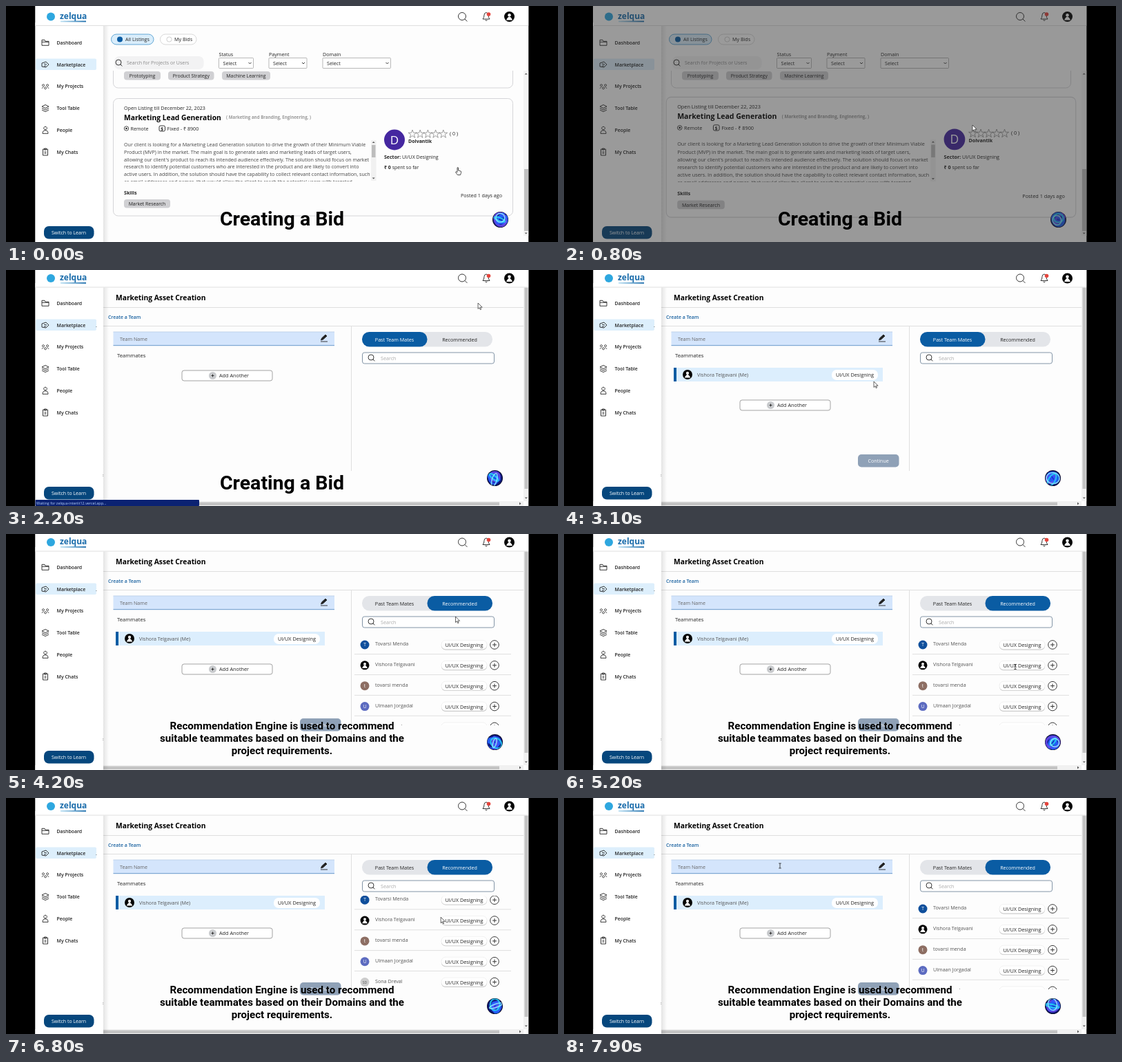
Recreate the animation shown at these times as an HTML page. Size 800 by 343 pixels, loop 8 s.

```html
<!DOCTYPE html>
<html lang="en">
<head>
<meta charset="utf-8">
<title>Creating a Bid</title>
<style>
html, body { margin: 0; width: 100%; height: 100%; overflow: hidden; background: #000; }
svg { display: block; width: 800px; height: 343px; }
text { font-family: "Open Sans", "Noto Sans", sans-serif; white-space: pre; }
.over text { font-family: Roboto, "Liberation Sans", sans-serif; font-weight: 700; text-anchor: middle; }
</style>
</head>
<body>
<svg id="stage" viewBox="0 0 800 343" xmlns="http://www.w3.org/2000/svg"></svg>
<script>
const LOOP = 8000, STEP = 100;
const BLUE = '#0a5ca3', INK = '#222', PAGE = '#fdfdfd';

// Markup helpers
const attrs = o => Object.entries(o).map(([k, v]) => ` ${k}="${v}"`).join('');
const tag = (name, o, inner = '') => `<${name}${attrs(o)}>${inner}</${name}>`;
const rect = (x, y, width, height, fill, o = {}) => tag('rect', { x, y, width, height, fill, ...o });
const circle = (cx, cy, r, fill, o = {}) => tag('circle', { cx, cy, r, fill, ...o });
const path = (d, o = {}) => tag('path', { d, fill: 'none', stroke: INK, 'stroke-width': 0.9, ...o });
const group = (o, ...parts) => tag('g', o, parts.join(''));
const text = (x, y, str, o = {}) => tag('text', { x, y, 'font-size': 7.15, fill: INK, ...o }, str);
const mid = { 'text-anchor': 'middle' }, bold = { 'font-weight': 700 };
const line = (x1, y1, x2, y2, stroke = '#dcdcdc') => path(`M${x1} ${y1}L${x2} ${y2}`, { stroke });
const chip = (x, y, w, label) => rect(x, y, w, 12.5, '#d0d0d3', { rx: 4 }) + text(x + w / 2, y + 8.8, label, { ...mid, 'font-size': 6.9 });
const lens = (x, y, r) => circle(x, y, r, 'none', { stroke: INK, 'stroke-width': 0.9 }) + path(`M${x + r * .7} ${y + r * .7}l${r * .65} ${r * .65}`);
const arrowHead = (x, y, d) => path(`M${x - 2} ${y + d}l2 ${-2 * d}l2 ${2 * d}z`, { fill: '#555', stroke: 'none' });

const person = (x, y, r) => circle(x, y, r, '#050505') +
  circle(x, y - r * .3, r * .3, '#fff') + path(`M${x - r * .6} ${y + r * .65}q${r * .6} ${-r * 1.3} ${r * 1.2} 0z`, { fill: '#fff', stroke: 'none' });

function sidebar() {
  const icons = [
    'M-5 -4h4l1 2h5v6h-10zM-5 -1h10',
    'M-5 -2l6 -2l4 4l-4 4l-6 -1zM-2 -1l4 1M-2 2h3',
    'M-3 -3a1.5 1.5 0 1 0 .1 0zM3 -3a1.5 1.5 0 1 0 .1 0zM0 1a1.5 1.5 0 1 0 .1 0zM-5 3l2 -2M5 3l-2 -2',
    'M0 -5l5 2.5l-5 2.5l-5 -2.5zM-5 0l5 2.5l5 -2.5M-5 2.5l5 2.5l5 -2.5',
    'M0 -5a2.3 2.3 0 1 0 .1 0zM-4 5q0 -4.5 4 -4.5t4 4.5z',
    'M-3.5 -4h7v9h-7zM-1.5 -5h3v2h-3zM-1.5 0h3M-1.5 2h3'];
  const labels = ['Dashboard', 'Marketplace', 'My Projects', 'Tool Table', 'People', 'My Chats'];
  return rect(42.5, 24, 98.5, 330, '#fff') + rect(141, 24, 8, 330, 'url(#shade)') +
    rect(43, 76.5, 88, 16.5, '#ddeffc', { rx: 2 }) +
    labels.map((label, i) => {
      const y = 53.3 + i * 31.75;
      return path(icons[i], { transform: `translate(57 ${y})` }) +
        text(73.5, y + 2.6, label, { 'font-size': 6.95, 'font-weight': 600 });
    }).join('') +
    rect(55, 320, 72.5, 18.5, '#06477d', { rx: 7 }) +
    text(91, 332, 'Switch to Learn', { ...mid, fill: '#fff', 'font-size': 7 });
}

const header = () => rect(42.5, -4, 715, 33, '#fff') +
  circle(65, 15.5, 6, '#2ea7df') +
  text(78, 18.5, 'zelqua', { ...bold, 'font-size': 12, fill: '#1a6cab' }) +
  rect(79, 21.5, 37, 1.8, 'url(#brand)') +
  lens(661, 15, 5.5) +
  path('M691 19q2 -2 2 -6q0 -3 3 -3.5q3 .5 3 3.5q0 4 2 6zM694.5 20.5q1.5 1.5 3 0') + circle(699.5, 12, 2.8, '#e5453d') +
  person(729.5, 15.5, 7.5) + line(43, 28.5, 757, 28.5);

const select = (x, w, label) => text(x, 72.5, label) +
  rect(x, 75.5, w, 15, '#fff', { stroke: '#8a8a8a', 'stroke-width': .6, rx: 1 }) +
  text(x + 6, 86, 'Select') + path(`M${x + w - 7} 82l2 2l2 -2`);

const DESCRIPTION = [
  'Our client is looking for a Marketing Lead Generation solution to drive the growth of their Minimum Viable',
  'Product (MVP) in the market. The main goal is to generate sales and marketing leads of target users,',
  'allowing our client\'s product to reach its intended audience effectively. The solution should focus on market',
  'research to identify potential customers who are interested in the product and are likely to convert into',
  'active users. In addition, the solution should have the capability to collect relevant contact information, such',
  'as email addresses and names, that would allow the client to reach the potential users with targeted'];

const listingHead = () => text(171, 151, 'Open Listing till December 22, 2023') +
  text(171, 165.5, 'Marketing Lead Generation', { ...bold, 'font-size': 10.3, fill: '#000' }) +
  text(319, 164, '( Marketing and Branding, Engineering, )', { ...bold, 'font-size': 6.15, fill: '#999' }) +
  circle(174.5, 178, 3.2, 'none', { stroke: INK, 'stroke-width': .8 }) + circle(174.5, 178, 1.3, INK) +
  text(180.5, 180.6, 'Remote') +
  rect(222, 174, 8.5, 8, 'none', { stroke: INK, 'stroke-width': .9, rx: 2 }) + text(226.2, 180.6, '$', { ...mid, ...bold, 'font-size': 6.5 }) +
  text(233.5, 180.6, 'Fixed - ₹ 8900') +
  group({ 'clip-path': 'url(#descClip)' }, ...DESCRIPTION.map((s, i) => text(171, 203.8 + i * 10.85, s, { 'font-size': 7.12, fill: '#444' })));

function card() {
  const star = 'M0 -6l1.5 4.2h4.4l-3.5 2.7l1.3 4.4l-3.7 -2.7l-3.7 2.7l1.3 -4.4l-3.5 -2.7h4.4z';
  const stars = [0, 1, 2, 3, 4].map(i => path(star, { transform: `translate(${589 + i * 11.2} 186)`, stroke: '#777', 'stroke-width': .7 }));
  return rect(155.5, 134.5, 579, 170.5, PAGE, { rx: 7, stroke: '#d5d5d8' }) + listingHead() +
    rect(529, 195, 7.5, 59, '#f1f1f1') + rect(530, 202, 5.5, 18, '#bdbdbd') + arrowHead(532.7, 198, 1) + arrowHead(532.7, 250.5, -1) +
    text(171, 274, 'Skills', bold) + chip(171, 281, 67, 'Market Research') +
    circle(563, 194.5, 15, '#4527a0') + text(563, 200.5, 'D', { ...mid, 'font-size': 17, fill: '#fff' }) +
    stars.join('') + text(643, 188, '( 0 )') + text(583, 199, 'Dolvantik', { ...bold, 'font-size': 7 }) +
    text(548, 221.5, '<tspan font-weight="700">Sector:</tspan> UI/UX Designing', { 'font-size': 7 }) +
    text(548, 236.5, '<tspan font-weight="700">₹ 0</tspan> spent so far', { 'font-size': 7 }) +
    text(719, 277.5, 'Posted 1 days ago', { 'text-anchor': 'end' });
}

const market = () => rect(42.5, 0, 715, 343, PAGE) +
  rect(152.5, 41, 61.5, 15, '#d9edfb', { rx: 7.5, stroke: '#3f93cb', 'stroke-width': .8 }) + circle(165, 48.5, 4, BLUE) + text(173, 51.2, 'All Listings') +
  rect(223.5, 41, 52.5, 15, '#fff', { rx: 7.5, stroke: '#cfcfcf', 'stroke-width': .8 }) + circle(236.5, 48.5, 3.6, '#fff', { stroke: '#bbb', 'stroke-width': .7 }) + text(244, 51.2, 'My Bids') +
  rect(157, 73, 129.5, 19, '#f2f2f3', { rx: 7 }) + lens(163, 82, 4) + text(175, 85.2, 'Search for Projects or Users', { fill: '#8a8a8a', 'font-size': 7 }) +
  select(308.5, 50, 'Status') + select(381, 55, 'Payment') + select(459, 98.5, 'Domain') +
  group({ 'clip-path': 'url(#feedClip)' },
    rect(155.5, 60, 579, 59, PAGE, { rx: 7, stroke: '#d5d5d8' }),
    chip(171, 95, 53, 'Prototyping'), chip(235, 95, 66.5, 'Product Strategy'), chip(313, 95, 70, 'Machine Learning')) +
  rect(750, 94, 7.5, 240, '#f4f4f4') + rect(751, 237, 6, 90, '#c1c1c1') + arrowHead(753.7, 98.5, 1) + arrowHead(753.7, 330.5, -1) +
  group({ id: 'card' }, card()) + sidebar() + header();

const drawer = () => rect(127, 0, 630.5, 343, '#fff') + group({ transform: 'translate(-26 -100)' }, listingHead());

const team = () => rect(42.5, 0, 715, 343, PAGE) +
  text(159, 44, 'Marketing Asset Creation', { ...bold, 'font-size': 10.3, fill: '#000' }) +
  line(141, 54.5, 750, 54.5) + text(148, 71.3, 'Create a Team', { 'font-weight': 600, 'font-size': 6.9, fill: '#17609f' }) +
  line(141, 81.5, 750, 81.5) + line(500.5, 82, 500.5, 292) +
  rect(155.5, 90, 320.5, 20, '#d4e5fc') + line(155.5, 90, 476, 90, '#b9cfe8') + line(155.5, 109.7, 476, 109.7, '#5d8fc5') +
  text(165, 102.7, 'Team Name', { fill: '#666' }) +
  path('M456.5 102l1 -3l5.5 -5l2 2l-5.5 5z', { fill: INK }) + line(456, 104, 466, 104, INK) +
  text(161, 126.8, 'Teammates', { 'font-size': 7.65 }) +
  group({ id: 'mate' },
    rect(159, 142, 303, 20, '#dceefd'), rect(159, 142, 4, 20, BLUE), person(179, 152, 7),
    text(193, 155, 'Vishora Telgavani (Me)', { fill: '#555' }),
    rect(388, 145, 67, 15, '#fff', { rx: 7 }), text(421.5, 155, 'UI/UX Designing', { ...mid, 'font-size': 7.3 }),
    rect(426, 268, 59.5, 18.5, '#8fa1b7', { rx: 5 }), text(455.7, 280, 'Continue', { ...mid, fill: '#fff' })) +
  group({ id: 'add' }, rect(255, 146, 131, 15, '#fff', { rx: 3, stroke: '#999', 'stroke-width': .9 }),
    circle(299.5, 153.5, 5.5, '#c9cbce'), path('M297.5 153.5h4M299.5 151.5v4'), text(309, 156.3, 'Add Another', { 'font-size': 7.3 })) +
  rect(516, 90, 189, 21.5, '#e3e5e9', { rx: 10.5 }) +
  tag('rect', { id: 'tab', y: 90, width: 94.5, height: 21.5, rx: 10.5, fill: BLUE }) +
  text(563, 103.5, 'Past Team Mates', { ...mid, id: 'past' }) + text(657.5, 103.5, 'Recommended', { ...mid, id: 'recommended' }) +
  rect(516.5, 120, 191, 16, '#fff', { rx: 3, stroke: '#75899c', 'stroke-width': .9 }) + lens(529, 127, 4) + text(543, 130.8, 'Search', { fill: '#aaa' }) +
  group({ id: 'list', 'clip-path': 'url(#listClip)' }, group({ id: 'rows' }, ...PEOPLE.map(row))) +
  rect(750, 0, 7.5, 336, '#f1f1f1') + rect(751.5, 0, 5, 318, '#c3c3c3') + arrowHead(753.8, 331.5, -1) +
  rect(42.5, 336, 707.5, 7, '#f1f1f1') + rect(50, 337.5, 665, 4.5, '#c3c3c3') +
  path('M47.5 337.5v4l-2.5 -2zM744 337.5v4l2.5 -2z', { fill: '#555', stroke: 'none' }) +
  group({ transform: 'translate(0 -5)' }, sidebar()) + group({ transform: 'translate(0 -3.5)' }, header()) +
  text(130, 83, '.') + text(140, 300, ':', { 'font-size': 6 });

const DESIGN = ['UI/UX Designing', 66], SOFTWARE = ['Software Development', 87], BRANDING = ['Marketing and Branding', 91];
const PEOPLE = [
  ['Tovarsi Menda', DESIGN, '#0f4f9c', 'T'], ['Vishora Telgavani', DESIGN],
  ['tovarsi menda', DESIGN, '#8d6e63', 't'], ['Ulmaan Jorgadal', DESIGN, '#5c6bc0', 'U'],
  ['Sona Dreval', DESIGN, '#ccc', 'SD'], ['Pel Harvone', DESIGN, '#ccc', 'PH'],
  ['Ona Felky', SOFTWARE, '#ccc', 'OF'], ['Jory Castenduz', BRANDING, '#ccc', 'JC'],
  ['Nalvek Porit', SOFTWARE, '#0d3a52', ''], ['Dolvantik', DESIGN, '#4527a0', 'D']];

function row([name, [skill, w], color, initials], i) {
  const y = 161 + i * 29.85;
  const face = color
    ? circle(520, y, 6.5, color) + text(520, y + 2.2, initials, { ...mid, 'font-size': initials.length > 1 ? 5 : 6.5, fill: color === '#ccc' ? '#555' : '#fff' })
    : person(520, y, 6.5);
  return face + text(535, y + 1.2, name, { fill: '#555' }) +
    rect(697 - w, y - 5.6, w, 13, '#bbb', { rx: 6 }) + rect(697 - w, y - 6.5, w, 13, '#fff', { rx: 6, stroke: '#e4e4e4', 'stroke-width': .5 }) +
    text(697 - w / 2, y + 3.2, skill, { ...mid, 'font-size': 7.3 }) +
    circle(708, y, 6.3, '#fff', { stroke: INK, 'stroke-width': .9 }) + path(`M705 ${y}h6M708 ${y - 3}v6`) +
    line(505, y + 13.7, 732, y + 13.7, '#ddd');
}

const defs = () => {
  const clip = (id, shape) => tag('clipPath', { id }, shape);
  const stop = (offset, color, alpha = 1) => tag('stop', { offset, 'stop-color': color, 'stop-opacity': alpha });
  return tag('defs', {}, clip('descClip', rect(165, 194, 364, 61)) + clip('feedClip', rect(150, 94, 600, 249)) +
    clip('listClip', rect(501, 142, 249, 136)) + clip('ball', circle(0, 0, 11)) +
    tag('linearGradient', { id: 'shade' }, stop(0, '#000', .1) + stop(1, '#000', 0)) +
    tag('linearGradient', { id: 'brand' }, stop(0, '#bfe3f5') + stop(1, '#1a6cab')) +
    tag('radialGradient', { id: 'deep' }, stop(0, '#1a2fd0') + stop(1, '#0a1266')));
};

const swirls = ['#1f6dff', '#6a4df0', '#2a5cff', '#25d3f5', '#8ff0ff'];
const globe = () => group({ id: 'globe' }, circle(0, 0, 11.5, '#0a0a22'),
  group({ 'clip-path': 'url(#ball)' }, circle(0, 0, 11, 'url(#deep)'),
    ...swirls.map((c, i) => tag('ellipse', { class: 'swirl', fill: 'none', stroke: c, 'stroke-width': 4 - i * .6, opacity: .85 }))));

const stage = document.getElementById('stage');
stage.innerHTML = defs() + rect(0, 0, 800, 343, '#000') +
  group({ id: 'market' }, market()) + group({ id: 'team' }, team()) + globe() +
  rect(42.5, 0, 715, 343, '#2d2d2d', { id: 'dim' }) + group({ id: 'drawer', 'clip-path': 'url(#pageClip)' }, drawer()) +
  group({ id: 'status' }, rect(42.5, 334, 237.5, 9, '#0b2272', { rx: 1 }), text(44, 341, 'Waiting for zelqua-interiit12.vercel.app...', { 'font-size': 5.4, fill: '#b9d3ff' })) +
  rect(757.5, 0, 42.5, 343, '#000') +
  group({ class: 'over' }, text(400, 318.5, 'Creating a Bid', { id: 'title', 'font-size': 28.5, fill: '#000' }),
    group({ id: 'caption' }, ...['Recommendation Engine is used to recommend', 'suitable teammates based on their Domains and the', 'project requirements.']
      .map((s, i) => text(400, 284.3 + i * 17.8, s, { 'font-size': 15.15, fill: '#000' })))) +
  group({ id: 'cursor' },
    path('M0 0v8.5l2 -1.8l1.3 3l1.3 -.6l-1.3 -2.9h2.8z', { id: 'arrow', fill: '#fff', 'stroke-width': .7 }),
    path('M-1 0q1 -1 1.5 0v4l3.5 1q1 .5 .5 2.5l-1 3h-4l-3 -4q0 -1.5 2.5 0z', { id: 'hand', fill: '#fff', 'stroke-width': .8 }),
    path('M-1.8 -3.5h3.6M0 -3.5v7M-1.8 3.5h3.6', { id: 'beam', 'stroke-width': .8 }));
document.getElementById('drawer').removeAttribute('clip-path');

const parts = Object.fromEntries([...stage.querySelectorAll('[id]')].map(el => [el.id, el]));
const swirlNodes = [...stage.querySelectorAll('.swirl')];
const set = (id, name, value) => parts[id].setAttribute(name, value);
const show = (id, on) => set(id, 'display', on ? 'inline' : 'none');
const ramp = (t, a, b) => { const p = Math.min(1, Math.max(0, (t - a) / (b - a))); return p * p * (3 - 2 * p); };

// time, x, y, pointer shape from then on
const POINTER = [
  [0, 655, 235, 'hand'], [150, 655, 235, 'hand'], [500, 610, 195, 'arrow'], [800, 592, 173, 'arrow'], [1000, 592, 173, 'arrow'],
  [1600, 685, 48, 'arrow'], [2300, 684, 48, 'arrow'], [2850, 335, 175, 'arrow'], [3100, 449, 162, 'arrow'], [3700, 652, 99, 'arrow'],
  [4000, 652, 99, 'arrow'], [4600, 650, 180, 'beam'], [5200, 654, 193, 'beam'], [5400, 660, 193, 'arrow'], [6100, 694, 191, 'arrow'],
  [6600, 694, 191, 'arrow'], [7300, 372, 101, 'beam'], [7800, 313, 98.5, 'beam'], [8000, 313, 98.5, 'beam']];

function movePointer(t) {
  const i = POINTER.findIndex((k, n) => t < POINTER[n + 1][0]);
  const [t0, x0, y0, shape] = POINTER[i], [t1, x1, y1] = POINTER[i + 1];
  const p = ramp(t, t0, t1);
  set('cursor', 'transform', `translate(${x0 + (x1 - x0) * p} ${y0 + (y1 - y0) * p})`);
  for (const id of ['arrow', 'hand', 'beam']) show(id, id === shape);
}

function render(t) {
  const onTeam = t >= 2000, recommending = t >= 3900, joined = t >= 2500;
  show('market', !onTeam);
  show('team', onTeam);
  const scale = 1 + .025 * ramp(t, 50, 400);
  set('card', 'transform', `translate(445 220) scale(${scale}) translate(-445 -220)`);
  set('dim', 'opacity', onTeam ? 0 : .48 * ramp(t, 450, 800));
  show('drawer', !onTeam && t >= 1000);
  set('drawer', 'transform', `translate(${631 * (1 - ramp(t, 900, 1400))} 0)`);

  show('status', onTeam && t < 2500);
  show('title', t < 2700);
  show('caption', t >= 4200);
  show('mate', joined);
  set('add', 'transform', `translate(0 ${joined ? 43 : 0})`);
  set('tab', 'x', recommending ? 610.5 : 516);
  set('past', 'fill', recommending ? INK : '#fff');
  set('recommended', 'fill', recommending ? '#fff' : INK);
  show('list', recommending);
  set('rows', 'transform', `translate(0 ${-173 * (ramp(t, 5300, 6050) - ramp(t, 6300, 6900))})`);

  set('globe', 'transform', onTeam ? 'translate(708.5 302.5)' : 'translate(716.5 310.5)');
  swirlNodes.forEach((node, i) => {
    const turn = t * .09 + i * 67, phase = t / 420 + i * 1.7;
    node.setAttribute('rx', 8 + 2 * Math.sin(phase * .6));
    node.setAttribute('ry', 5 + 3 * Math.sin(phase));
    node.setAttribute('cx', 3 * Math.cos(phase));
    node.setAttribute('transform', `rotate(${turn})`);
  });
  movePointer(t);
}

const start = performance.now();
function tick() {
  const t = (performance.now() - start) % LOOP;
  render(Math.floor(t / STEP) * STEP);
  requestAnimationFrame(tick);
}
render(0);
requestAnimationFrame(tick);
</script>
</body>
</html>
```
